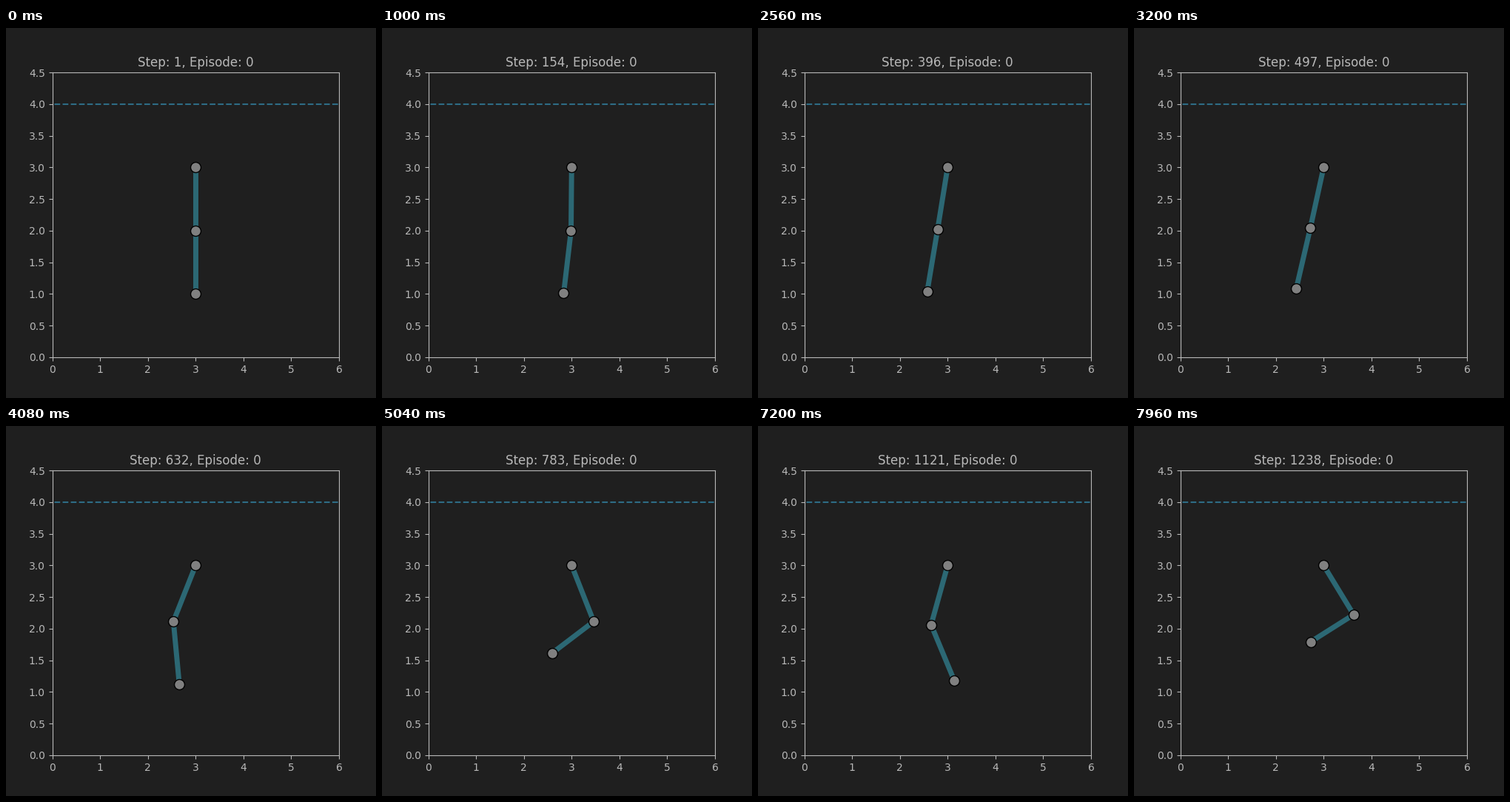
Recreate the animation shown at these times as a matplotlib script. Size 500x500 px, loop 8000 ms.

```python
import numpy as np
import matplotlib.pyplot as plt
from matplotlib.animation import FuncAnimation

FRAMES, INTERVAL = 200, 40
BG, FG = "#1f1f1f", "#b8b8b8"
ARM, GOAL = "#2c6874", "#2e6c85"
PIVOT = np.array([3.0, 3.0])
ROOT2 = np.sqrt(2)

# Key poses: time (s), step counter, upper and lower arm angles (deg)
KEY_T, STEPS, UPPER, LOWER = np.array([
    (0.00, 1, 0, 0),
    (1.88, 289, -1.3, -16.7),
    (3.20, 497, -16.2, -17.1),
    (4.08, 632, -27.7, 7.1),
    (6.00, 934, 29.8, -52.6),
    (7.20, 1121, -20.2, 28.8),
    (7.96, 1238, 38.9, -64.5),
]).T


def wave(t):
    """Swing that slows from 1.58 to 1 cycle per second as it grows."""
    cycles = t - 7.875 - 0.232 * np.log1p(np.exp((5 - t) / 0.4))
    return np.cos(2 * np.pi * cycles)


# Split each pose into the two modes of a double pendulum:
# both arms leaning together, and both swinging against each other.
LEAN = (UPPER + LOWER / ROOT2) / 2
SWING = (UPPER - LOWER / ROOT2) / 2 / wave(KEY_T)


def joints(t):
    lean = np.interp(t, KEY_T, LEAN)
    swing = np.interp(t, KEY_T, SWING) * wave(t)
    points = [PIVOT]
    for angle in np.radians([lean + swing, ROOT2 * (lean - swing)]):
        points.append(points[-1] + [np.sin(angle), -np.cos(angle)])
    return np.transpose(points)


plt.rcParams.update({
    "font.family": "DejaVu Sans",
    "figure.facecolor": BG, "axes.facecolor": BG, "axes.edgecolor": FG,
    "text.color": FG, "axes.titlecolor": FG,
    "xtick.color": FG, "ytick.color": FG,
})

fig, ax = plt.subplots(figsize=(5, 5), dpi=100)
ax.set_xlim(0, 6)
ax.set_ylim(0, 4.5)
ax.axhline(4, color=GOAL, lw=1.5, ls=(4.1, (3.7, 1.6)))
rods, = ax.plot([], [], color=ARM, lw=5, solid_capstyle="butt")
dots, = ax.plot([], [], "o", ms=10, mfc="#808080", mec="black", mew=1)
title = ax.set_title("")


def update(i):
    t = i * INTERVAL / 1000
    x, y = joints(t)
    rods.set_data(x, y)
    dots.set_data(x, y)
    step = int(round(np.interp(t, KEY_T, STEPS)))
    title.set_text(f"Step: {step}, Episode: 0")
    return rods, dots, title


anim = FuncAnimation(fig, update, frames=FRAMES, interval=INTERVAL,
                     repeat=True, repeat_delay=0, blit=False)
plt.show()
```
